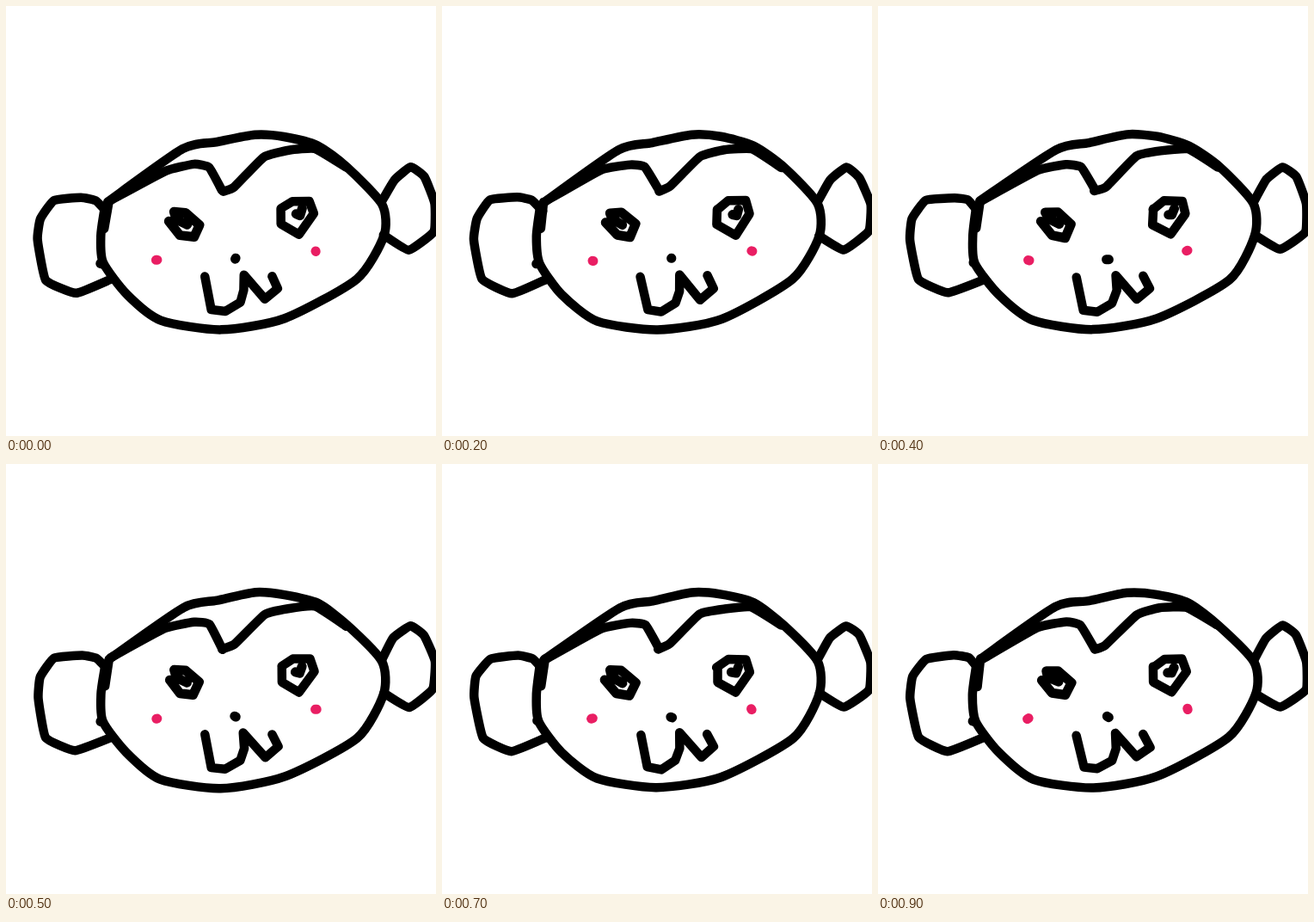
These frames come from a looping animation (500 by 500 pixels, 1000 ms). An HTML page with a canvas:

```html
<!DOCTYPE html>
<html lang="en">
<head>
<meta charset="utf-8">
<title>Wobbly monkey</title>
<style>
  html, body { margin: 0; width: 100%; height: 100%; overflow: hidden; background: #fff; }
  canvas { display: block; width: 100vmin; height: 100vmin; }
</style>
</head>
<body>
<canvas id="stage" width="500" height="500"></canvas>
<script>
const ctx = document.getElementById('stage').getContext('2d');
const POSES = 10, HOLD = 100, WOBBLE = 1.8;
const INK = '#000', PINK = '#e91e63';

// Key points as flat x, y lists
const HEAD = [119,227, 206,167, 245,159, 290,150, 324,152, 362,162, 397,188, 437,230, 439,267,
  408,318, 325,364, 250,377, 180,366, 140,335, 113,299, 110,268, 114,238];
const FRINGE_L = [122,226, 185,191, 219,184, 236,187, 252,215];
const FRINGE_R = [252,215, 265,210, 300,175, 328,168, 360,166, 395,188];
const EAR_L = [117,239, 105,226, 88,223, 56,226, 40,247, 37,272, 47,318, 81,334, 122,318];
const EAR_R = [437,228, 451,202, 470,188, 486,199, 498,230, 497,262, 468,283, 439,267];
const EYE_L = [190,251, 203,266, 218,269, 225,254, 209,240, 195,240, 198,248, 210,254];
const EYE_R = [320,236, 333,227, 353,227, 358,242, 341,266, 320,254, 320,236];
const PUPIL = [337,242, 342,243, 345,236];
const MOUTH = [231,315, 239,353, 255,355, 272,345, 277,331, 276,313, 301,341, 316,329, 309,314];

function seeded(seed) {
  let s = seed * 7919 + 17;
  return () => {
    s = (s + 0x6D2B79F5) | 0;
    let t = Math.imul(s ^ (s >>> 15), 1 | s);
    t ^= t + Math.imul(t ^ (t >>> 7), 61 | t);
    return ((t ^ (t >>> 14)) >>> 0) / 4294967296;
  };
}

// Every pose is the same drawing, redrawn by an unsteady hand
function drawPose(pose) {
  const rand = seeded(pose + 1);
  const shake = list => list.map(v => v + (rand() - 0.5) * WOBBLE);

  // bend 0 gives straight segments, 1 a Catmull-Rom curve
  const stroke = (list, bend = 0, width = 10.5, color = INK) => {
    const flat = shake(list), last = flat.length / 2 - 1;
    const at = i => {
      const k = 2 * Math.min(Math.max(i, 0), last);
      return [flat[k], flat[k + 1]];
    };
    ctx.strokeStyle = color;
    ctx.lineWidth = width;
    ctx.beginPath();
    ctx.moveTo(...at(0));
    for (let i = 0; i < last; i++) {
      const [a, b, c, d] = [at(i - 1), at(i), at(i + 1), at(i + 2)];
      const near = b.map((v, k) => v + (c[k] - a[k]) * bend / 6);
      const far = c.map((v, k) => v - (d[k] - b[k]) * bend / 6);
      ctx.bezierCurveTo(...near, ...far, ...c);
    }
    ctx.stroke();
  };
  const dot = (x, y, color) => stroke([x - 0.7, y, x + 0.7, y], 0, 11, color);

  ctx.fillStyle = '#fff';
  ctx.fillRect(0, 0, 500, 500);
  ctx.lineCap = ctx.lineJoin = 'round';

  stroke(HEAD, 0.7);
  stroke([119,227, 115,259]);
  stroke(FRINGE_L, 0.4);
  stroke(FRINGE_R, 0.4);
  stroke(EAR_L, 0.4);
  stroke(EAR_R, 0.4);
  stroke(EYE_L, 0, 11);
  stroke(EYE_R);
  stroke(PUPIL, 0, 11);
  stroke(MOUTH);
  dot(111, 299, INK);
  dot(267, 294, INK);
  dot(175, 296, PINK);
  dot(360, 285, PINK);
}

let shown = -1;
function tick() {
  const pose = Math.floor(performance.now() / HOLD) % POSES;
  if (pose !== shown) drawPose(shown = pose);
  requestAnimationFrame(tick);
}
tick();
</script>
</body>
</html>
```
